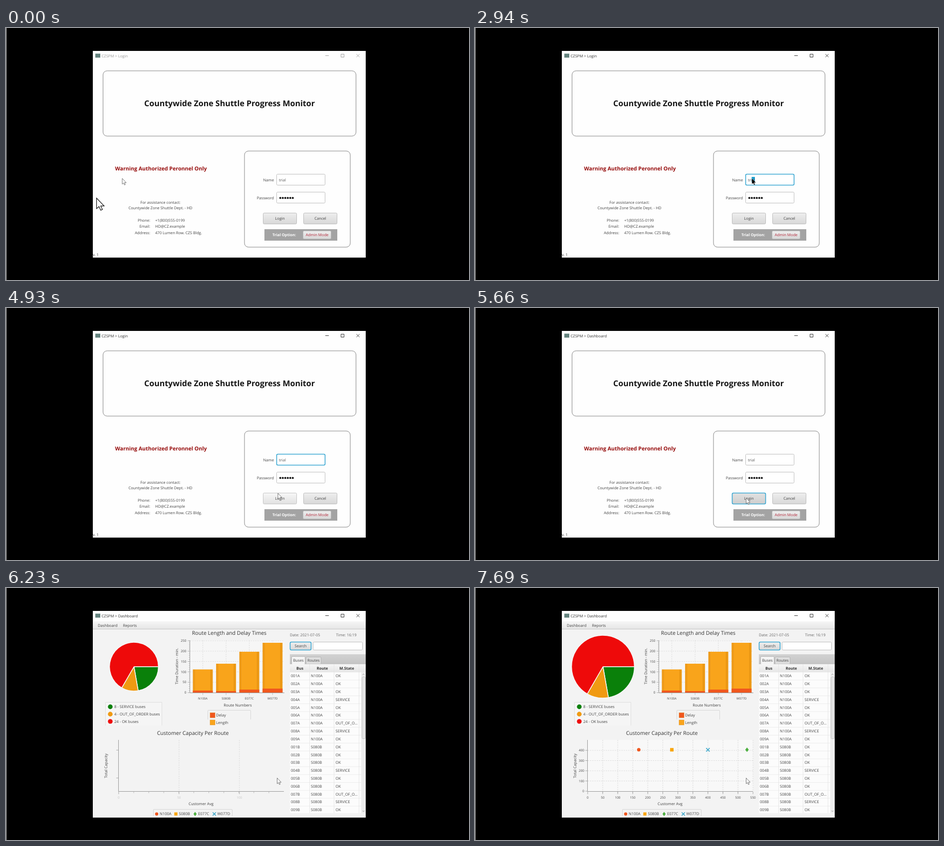
An HTML page that plays this animation: 928 px wide and 506 px high, repeating every 8000 ms.

```html
<!DOCTYPE html>
<html lang="en">
<head>
<meta charset="utf-8">
<title>Login and dashboard</title>
<style>
html, body { margin: 0; width: 100%; height: 100%; overflow: hidden; background: #000; }
svg { display: block; width: 928px; height: 506px; }
text { font: 7.65px "Open Sans", "Noto Sans", sans-serif; fill: #444; text-rendering: geometricPrecision; white-space: pre; }
.b { font-weight: 700; }
</style>
</head>
<body>
<svg id="stage" viewBox="0 0 928 506">
  <defs>
    <linearGradient id="btn" x2="0" y2="1"><stop stop-color="#eee"/><stop offset="1" stop-color="#d8d8d8"/></linearGradient>
    <linearGradient id="strip" x2="0" y2="1"><stop stop-color="#d2d2d2"/><stop offset="1" stop-color="#c4c4c4"/></linearGradient>
    <linearGradient id="menu" x2="0" y2="1"><stop stop-color="#f6f6f6"/><stop offset="1" stop-color="#e6e6e6"/></linearGradient>
    <linearGradient id="bar">
      <stop stop-color="#ee9a18"/><stop offset=".1" stop-color="#ee9a18"/><stop offset=".12" stop-color="#f9a41b"/>
      <stop offset=".86" stop-color="#f9a41b"/><stop offset=".9" stop-color="#e8940f"/><stop offset="1" stop-color="#f0a020"/>
    </linearGradient>
    <clipPath id="win"><rect x="174" y="46" width="547" height="415"/></clipPath>
    <clipPath id="plot"><rect x="226" y="305" width="332" height="104"/></clipPath>
  </defs>
</svg>
<script>
const LOOP = 8000, APP = 'CZSPM';
const RED = '#f0571f', GOLD = '#f9a41b', GREEN = '#4caf3f', BLUE = '#41a9cb';

function add(parent, tag, attrs = {}, content) {
  const e = document.createElementNS('http://www.w3.org/2000/svg', tag);
  for (const k in attrs) e.setAttribute(k, attrs[k]);
  if (content !== undefined) e.textContent = content;
  parent.append(e);
  return e;
}
const set = (e, attrs) => { for (const k in attrs) e.setAttribute(k, attrs[k]); };
const show = (e, on) => { e.style.display = on ? '' : 'none'; };
const rect = (p, x, y, w, h, fill, more) => add(p, 'rect', { x, y, width: w, height: h, fill, ...more });
const path = (p, d, stroke, more) => add(p, 'path', { d, stroke, fill: 'none', ...more });
function text(p, x, y, str, { size, fill, anchor = 'start', bold, turn } = {}) {
  const e = add(p, 'text', { x, y, 'text-anchor': anchor }, str);
  if (size) e.style.fontSize = size + 'px';
  if (fill) e.style.fill = fill;
  if (bold) e.setAttribute('class', 'b');
  if (turn) e.setAttribute('transform', `rotate(-90 ${x} ${y})`);
  return e;
}
const mid = (p, x, y, str, o) => text(p, x, y, str, { anchor: 'middle', ...o });
const right = (p, x, y, str, o) => text(p, x, y, str, { anchor: 'end', ...o });
function button(p, x, y, w, h, label, fill) {
  const r = rect(p, x + .5, y + .5, w - 1, h - 1, 'url(#btn)', { rx: 2, stroke: '#bcbcbc' });
  mid(p, x + w / 2, y + h / 2 + 2.8, label, { fill });
  return r;
}
const field = (p, x, y, w, h) => rect(p, x + .5, y + .5, w - 1, h - 1, '#fff', { rx: 2, stroke: '#bdbdbd' });
const focusRing = (p, x, y, w, h) => rect(p, x + .5, y + .5, w - 1, h - 1, 'none', { rx: 2.5, stroke: '#39a7d2', 'stroke-width': 1.6 });

function marker(p, kind, x, y, r = 3.5) {
  if (kind === 0) add(p, 'circle', { cx: x, cy: y, r, fill: RED });
  if (kind === 1) rect(p, x - r, y - r, 2 * r, 2 * r, '#f9a60f');
  if (kind === 2) path(p, `M${x} ${y - r - 1}L${x + r} ${y}L${x} ${y + r + 1}L${x - r} ${y}Z`, 'none', { fill: GREEN });
  if (kind === 3) path(p, `M${x - r} ${y - r}l${2 * r} ${2 * r}m0 ${-2 * r}l${-2 * r} ${2 * r}`, BLUE, { 'stroke-width': 1.7 });
}

const stage = document.getElementById('stage');
rect(stage, 0, 0, 928, 506, '#000');
rect(stage, 0, 0, 1, 506, '#c4c4c4');
const win = add(stage, 'g', { 'clip-path': 'url(#win)' });
rect(win, 174, 46, 547, 415, '#fefefe');

const login = add(win, 'g');
const dash = add(win, 'g');

// Title bar
rect(win, 179, 51.5, 10, 8, '#64837e');
const caption = text(win, 191.5, 58.5, '');
const controls = path(win, 'M640 55.5h7M671.5 52.5h6v6h-6zM702.5 52.5l6 6m0-6l-6 6', '#222', { 'stroke-width': .9 });

// Login screen
const panel = (x, y, w, h) => rect(login, x, y, w, h, '#fefefe', { rx: 8, stroke: '#858585' });
panel(194.5, 86, 507, 131);
panel(478, 247, 212, 193);
mid(login, 448, 157, 'Countywide Zone Shuttle Progress Monitor', { size: 16, bold: true, fill: '#151515' });
mid(login, 310.5, 286, 'Warning Authorized Peronnel Only', { size: 10.65, bold: true, fill: '#960c0c' });
mid(login, 309.5, 352.5, 'For assistance contact:');
mid(login, 309.5, 364, 'Countywide Zone Shuttle Dept. - HD');
[['Phone:', '+1(800)555-0199'], ['Email:', 'HD@CZ.example'], ['Address:', '470 Lumen Row. CZS Bldg.']].forEach(([k, v], i) => {
  right(login, 289, 389 + i * 12.3, k);
  text(login, 299, 389 + i * 12.3, v);
});
text(login, 174, 458, 'v. 1');
right(login, 537, 307.5, 'Name');
right(login, 537, 343.5, 'Password');
field(login, 542, 293, 98, 23);
field(login, 542, 329, 98, 23);
const selection = rect(login, 547, 299, 0, 11, '#1c9fd0');
text(login, 547, 307.5, 'trial', { fill: '#555' });
for (let i = 0; i < 6; i++) add(login, 'circle', { cx: 549.8 + i * 5, cy: 341.3, r: 2, fill: '#111' });
const nameRing = focusRing(login, 542, 293, 98, 23);
const loginBtn = button(login, 515, 371, 68, 23, 'Login');
button(login, 596, 371, 68, 23, 'Cancel');
const loginRing = focusRing(login, 515, 371, 68, 23);
rect(login, 518, 404, 146, 23, '#a3a3a3');
text(login, 534, 418, 'Trial Option:', { bold: true, fill: '#fff' });
button(login, 595, 407, 57, 17, 'Admin Mode', '#b52a3c');

// Dashboard frame
rect(dash, 174, 67, 547, 394, '#f3f3f3');
rect(dash, 174, 67, 547, 15, 'url(#menu)');
path(dash, 'M174 82.5h547', '#c6c6c6');
text(dash, 184, 77.5, 'Dashboard');
text(dash, 234.5, 77.5, 'Reports');

// Pie
const SLICES = [[0, 80, '#0a800a', '8 - SERVICE buses'], [80, 120, '#f09a12', '4 - OUT_OF_ORDER buses'], [120, 360, '#ee0a0a', '24 - OK buses']];
const wedges = SLICES.map(s => path(dash, '', '#f8f8f8', { fill: s[2], 'stroke-width': 1.5, 'stroke-linejoin': 'round' }));
function drawPie(r) {
  const at = deg => `${256.5 + r * Math.cos(deg * Math.PI / 180)} ${158 + r * Math.sin(deg * Math.PI / 180)}`;
  SLICES.forEach(([a, b], i) =>
    wedges[i].setAttribute('d', `M256.5 158L${at(a)}A${r} ${r} 0 ${b - a > 180 ? 1 : 0} 1 ${at(b)}Z`));
}
path(dash, 'M199.5 276V229.5H312.5V276', '#dedede', { fill: '#f5f5f5' });
SLICES.forEach(([, , fill, label], i) => {
  add(dash, 'circle', { cx: 209, cy: 238.5 + i * 14.7, r: 4.7, fill });
  text(dash, 217, 241.3 + i * 14.7, label);
});

// Stacked bars
mid(dash, 447.5, 94.3, 'Route Length and Delay Times', { size: 10.55, fill: '#333' });
rect(dash, 369, 105, 189, 105, '#f6f6f6');
const DASHED = { 'stroke-dasharray': '2.5 2', 'stroke-width': .8 };
for (let i = 0; i <= 5; i++) {
  const y = 210 - i * 20.8;
  path(dash, `M369 ${y}h189`, '#d9d9d9', DASHED);
  path(dash, `M364 ${y}h4`, '#999', { 'stroke-width': .8 });
  right(dash, 361.5, y + 2.2, i * 50, { size: 6.5 });
  for (let j = 1; j < 5 && i < 5; j++) path(dash, `M366 ${y - j * 4.16}h2`, '#aaa', { 'stroke-width': .6 });
}
[['N100A', 163.5, 206], ['S080B', 152, 207], ['E077C', 128, 204], ['W077D', 110, 202]].forEach(([label, top, delay], i) => {
  const x = 374.5 + i * 46.6;
  path(dash, `M${x + 20} 105V210`, '#d9d9d9', DASHED);
  rect(dash, x, top, 40, 210 - top, 'url(#bar)');
  rect(dash, x, delay, 40, 210 - delay, RED);
  mid(dash, x + 20, 224, label, { size: 6.1 });
  path(dash, `M${x + 20} 211v4`, '#aaa', { 'stroke-width': .7 });
});
path(dash, 'M368.5 105V210.5H558', '#999');
mid(dash, 345, 157, 'Time Duration - min.', { turn: true });
mid(dash, 464.5, 238, 'Route Numbers');
path(dash, 'M404.5 264V246.5Q404.5 245.5 406 245.5H489Q490.5 245.5 490.5 247V264', '#d6d6d6');
[['Delay', RED], ['Length', GOLD]].forEach(([label, c], i) => {
  rect(dash, 409, 250.5 + i * 14.5, 10, 10, c, { stroke: '#d9861a', 'stroke-width': .5 });
  text(dash, 421, 258 + i * 14.7, label);
});

// Scatter
mid(dash, 374.5, 295, 'Customer Capacity Per Route', { size: 10.55, fill: '#333' });
mid(dash, 202.5, 357, 'Total Capacity', { turn: true });
mid(dash, 391, 436, 'Customer Avg');
const scatter = add(dash, 'g');
const POINTS = [[170, 0], [280, 1], [530, 2], [400, 3]];
function drawScatter(step, alpha, ready) {
  scatter.replaceChildren();
  if (ready) rect(scatter, 226, 305, 332, 103, '#f8f8f8');
  for (let i = 0; i * step <= 332; i++) {
    const x = 225.8 + i * step;
    if (i) path(scatter, `M${x} 305V408`, '#d4d4d4', DASHED);
    path(scatter, `M${x} 409v5`, '#999', { 'stroke-width': .8 });
    mid(scatter, x, 423.2, i * 50, { size: 6.4 }).style.opacity = alpha;
  }
  for (let x = 256; x < 557; x += 30.1) path(scatter, `M${x} 409v3`, '#aaa', { 'stroke-width': .7 });
  if (ready) {
    for (let i = 0; i < 5; i++) {
      const y = 408 - i * 20.5;
      if (i) path(scatter, `M226 ${y}h332`, '#d4d4d4', DASHED);
      path(scatter, `M221 ${y}h4`, '#999', { 'stroke-width': .8 });
      right(scatter, 219, y + 2.3, i * 100, { size: 6.4 }).style.opacity = alpha;
    }
  } else path(scatter, 'M221 325.5h4m-4 56h4', '#999', { 'stroke-width': .8 });
  path(scatter, 'M225.5 305V408.5H557', '#999');
  if (!ready) return;
  const dots = add(scatter, 'g', { 'clip-path': 'url(#plot)', opacity: alpha });
  POINTS.forEach(([v, kind]) => marker(dots, kind, 225.8 + v / 50 * step, 324.8));
}
path(dash, 'M295.5 458V445Q295.5 444.5 297 444.5H452Q453.5 444.5 453.5 446V458', '#d6d6d6');
[[302, 'N100A'], [340.5, 'S080B'], [379, 'E077C'], [417.5, 'W077D']].forEach(([x, label], i) => {
  marker(dash, i, x, 453.7, 3.2);
  text(dash, x + 6, 456.4, label);
});

// Side table
text(dash, 569, 97, 'Date: 2021-07-05', { fill: '#666' });
text(dash, 661.5, 97, 'Time: 16:19', { fill: '#666' });
button(dash, 569, 108, 43, 17, 'Search');
focusRing(dash, 569, 108, 43, 17);
field(dash, 615, 108, 100, 17);
rect(dash, 569, 133, 152, 20, 'url(#strip)');
rect(dash, 572.5, 137.5, 27, 16, '#f4f4f4', { stroke: '#b5b5b5', rx: 1.5 });
rect(dash, 601.5, 138.5, 30, 14.5, '#dedede', { stroke: '#b5b5b5', rx: 1.5 });
mid(dash, 586, 148, 'Buses');
mid(dash, 616.3, 148, 'Routes');
rect(dash, 569, 153, 152, 16, 'url(#menu)');
[[589, 'Bus'], [634, 'Route'], [683, 'M.State']].forEach(([x, s]) => mid(dash, x, 164, s, { bold: true, fill: '#333' }));
rect(dash, 569, 169, 143, 283, '#fcfcfc');
const STATES = ['OK', 'OK', 'OK', 'SERVICE', 'OK', 'OK', 'OUT_OF_O...', 'SERVICE', 'OK'];
for (let i = 0; i < 18; i++) {
  const y = 169 + i * 15.82, line = i < 9 ? 'A' : 'B';
  path(dash, `M569 ${y}h143`, '#e9e9e9', { 'stroke-width': .8 });
  text(dash, 571, y + 10.3, `00${i % 9 + 1}${line}`);
  text(dash, 611, y + 10.3, i < 9 ? 'N100A' : 'S080B');
  text(dash, 660.5, y + 10.3, STATES[i % 9]);
}
path(dash, 'M608.5 153V452M657.5 153V452M707.5 153V452', '#e2e2e2', { 'stroke-width': .8 });
rect(dash, 712, 169, 9, 283, '#ededed');
rect(dash, 713.5, 178.5, 7, 124, '#e2e2e2', { rx: 2, stroke: '#c2c2c2' });
path(dash, 'M714.5 174.5l2-2 2 2M714.5 447l2 2 2-2', '#888', { 'stroke-width': .9 });

// Pointers
const ARROW = 'M0 0V11.5L2.6 9.2L4.4 13.2L6.2 12.4L4.4 8.6H8Z';
const bigPointer = path(stage, ARROW, '#111', { fill: '#fff', transform: 'translate(181.5 341.5) scale(1.9 1.85)', 'stroke-width': .65 });
const pointer = path(stage, ARROW, '#666', { fill: '#fff', 'stroke-width': .9 });

// time, x, y, dark
const MOVES = [
  [0, 233, 302], [190, 237, 299], [370, 258, 290], [550, 297, 277], [730, 340, 264], [910, 377, 254], [1090, 404, 247],
  [1280, 444, 205], [1460, 481, 180], [1640, 507, 178], [1830, 530, 205], [2010, 546, 248], [2200, 556, 284],
  [2370, 559, 298, 1], [2560, 561, 302, 1], [2750, 559, 302, 1], [2940, 555, 302, 1], [3110, 551, 302, 1], [3290, 548, 302, 1],
  [3660, 560, 303, 1], [3850, 570, 304, 1], [4030, 572, 304, 1], [4210, 570, 308, 1], [4390, 563, 314, 1], [4570, 555, 321],
  [4750, 549, 345, 1], [4930, 545, 372], [5110, 543.5, 381.5]
];
// time, selection start and width
const SELECT = [[0, 547, 0], [2750, 558, 3], [2940, 554.5, 6.5], [3110, 551, 10], [3290, 547, 14], [3660, 547, 0]];
// time, pie radius, spacing, label opacity, points ready
const GROW = [[0, 40, 121, 0, false], [6230, 49, 121, .25, false], [6410, 56.5, 60, .5, true], [6600, 61.5, 36, .85, true], [6780, 63, 30.13, 1, true]];
const at = (table, t) => table.findLast(row => row[0] <= t);

let drawn;
function render(t) {
  const active = t >= 2560, done = t >= 6040;
  const [, x, y, dark] = at(MOVES, t);
  set(pointer, { transform: `translate(${x} ${y})`, fill: dark ? '#000' : '#fff', stroke: dark ? '#fff' : '#666', 'stroke-width': dark ? .35 : .9 });
  show(bigPointer, t < 190);
  show(login, !done);
  show(dash, done);
  caption.textContent = `${APP} > ${t < 5660 ? 'Login' : 'Dashboard'}`;
  caption.style.fill = active ? '#333' : '#999';
  set(controls, { stroke: active ? '#222' : '#999' });
  const [, sx, w] = at(SELECT, t);
  set(selection, { x: sx, width: w });
  show(nameRing, active && t < 5490);
  show(loginRing, t >= 5490);
  loginBtn.style.filter = t >= 5490 ? 'brightness(.95)' : t >= 4930 ? 'brightness(1.04)' : '';
  const grow = at(GROW, t);
  if (grow !== drawn) {
    drawn = grow;
    drawPie(grow[1]);
    drawScatter(...grow.slice(2));
  }
}
function tick() {
  render(performance.now() % LOOP);
  requestAnimationFrame(tick);
}
tick();
</script>
</body>
</html>
```
